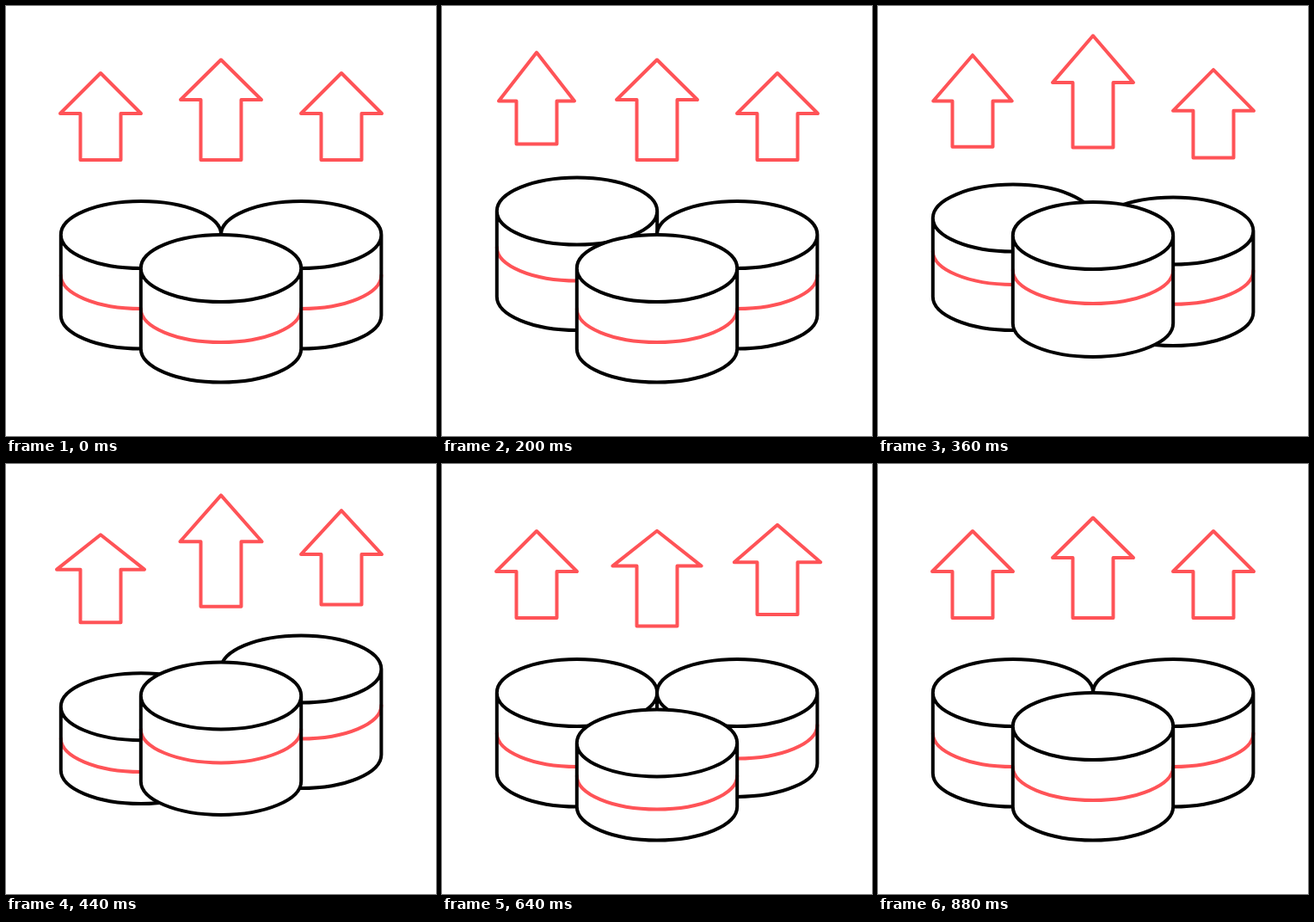
Animation, 500 px wide and 500 px high, one loop 1.48 s. Source, as an HTML page:

```html
<!DOCTYPE html>
<html lang="en">
<head>
<meta charset="utf-8">
<title>Cylinders and arrows</title>
<style>
  html, body { margin: 0; width: 100%; height: 100%; overflow: hidden; background: #fff; }
  svg { display: block; width: 100%; height: 100%; }
  path { fill: none; stroke-width: 4; stroke-linecap: round; stroke-linejoin: round; }
  .body { fill: #fff; }
  .line { stroke: #000; }
  .accent { stroke: #ff5357; }
</style>
</head>
<body>
<svg id="stage" viewBox="0 0 500 500"></svg>
<script>
  const LOOP = 1480, STEP = 40;
  const RX = 93.2, RY = 39, STEM = 23.5;

  // Each pair holds the offset at the top of the hop and at the squash after it.
  const HOP = { top: [-42.4, 23], band: [-50.1, 12.5], bottom: [-33, 0] };

  const units = [
    { x: 157, y: 266, delay: 80, ax: 110, tip: 78, head: 125,
      hop: { tip: [-37, 9], head: [-22.4, 0], base: [-28.5, 9.3], half: [-4.6, 5] } },
    { x: 343.2, y: 266, delay: 320, ax: 390, tip: 78, head: 125,
      hop: { tip: [-37, 9], head: [-30.8, 0], base: [-23.9, 7], half: [0, 5] } },
    { x: 250, y: 305, delay: 200, ax: 250, tip: 62.5, head: 109,
      hop: { tip: [-31.2, 18.1], head: [-22.2, 11.4], base: [-16.2, 11.4], half: [0, 5.5] } }
  ];

  const stage = document.getElementById('stage');

  function addPath(cls) {
    const p = document.createElementNS('http://www.w3.org/2000/svg', 'path');
    p.setAttribute('class', cls);
    return stage.appendChild(p);
  }

  for (const u of units) {
    u.body = addPath('body');
    u.band = addPath('accent');
    u.outline = addPath('line');
    u.arrow = addPath('accent');
  }

  const smooth = k => k * k * (3 - 2 * k);

  function ease(t, t0, t1, a, b) {
    return a + (b - a) * smooth((t - t0) / (t1 - t0));
  }

  // Rest, hop up, squash down, settle.
  function offset(t, [up, down]) {
    if (t <= 0 || t >= 560) return 0;
    if (t < 200) return ease(t, 0, 200, 0, up);
    if (t < 400) return ease(t, 200, 400, up, down);
    return ease(t, 400, 560, down, 0);
  }

  function drawCylinder(u, t) {
    const l = u.x - RX, r = u.x + RX;
    const top = u.y + offset(t, HOP.top);
    const band = u.y + 47 + offset(t, HOP.band);
    const bottom = u.y + 93.5 + offset(t, HOP.bottom);
    const arc = (sweep, x, y) => `A${RX} ${RY} 0 0 ${sweep} ${x} ${y}`;
    const shell = `M${l} ${top}V${bottom}${arc(0, r, bottom)}V${top}${arc(0, l, top)}`;
    u.body.setAttribute('d', shell + 'Z');
    u.band.setAttribute('d', `M${l} ${band}${arc(0, r, band)}`);
    u.outline.setAttribute('d', shell + arc(0, r, top));
  }

  function drawArrow(u, t) {
    const tip = u.tip + offset(t, u.hop.tip);
    const head = u.head + offset(t, u.hop.head);
    const base = 179 + offset(t, u.hop.base);
    const half = 47 + offset(t, u.hop.half);
    const x = u.ax;
    u.arrow.setAttribute('d',
      `M${x} ${tip}L${x + half} ${head}H${x + STEM}V${base}H${x - STEM}V${head}H${x - half}Z`);
  }

  function draw(ms) {
    const t = Math.floor((ms % LOOP) / STEP) * STEP;
    for (const u of units) {
      drawCylinder(u, t - u.delay);
      drawArrow(u, t - u.delay);
    }
  }

  const start = performance.now();

  function tick(now) {
    draw(Math.max(0, now - start));
    requestAnimationFrame(tick);
  }

  draw(0);
  requestAnimationFrame(tick);
</script>
</body>
</html>
```
